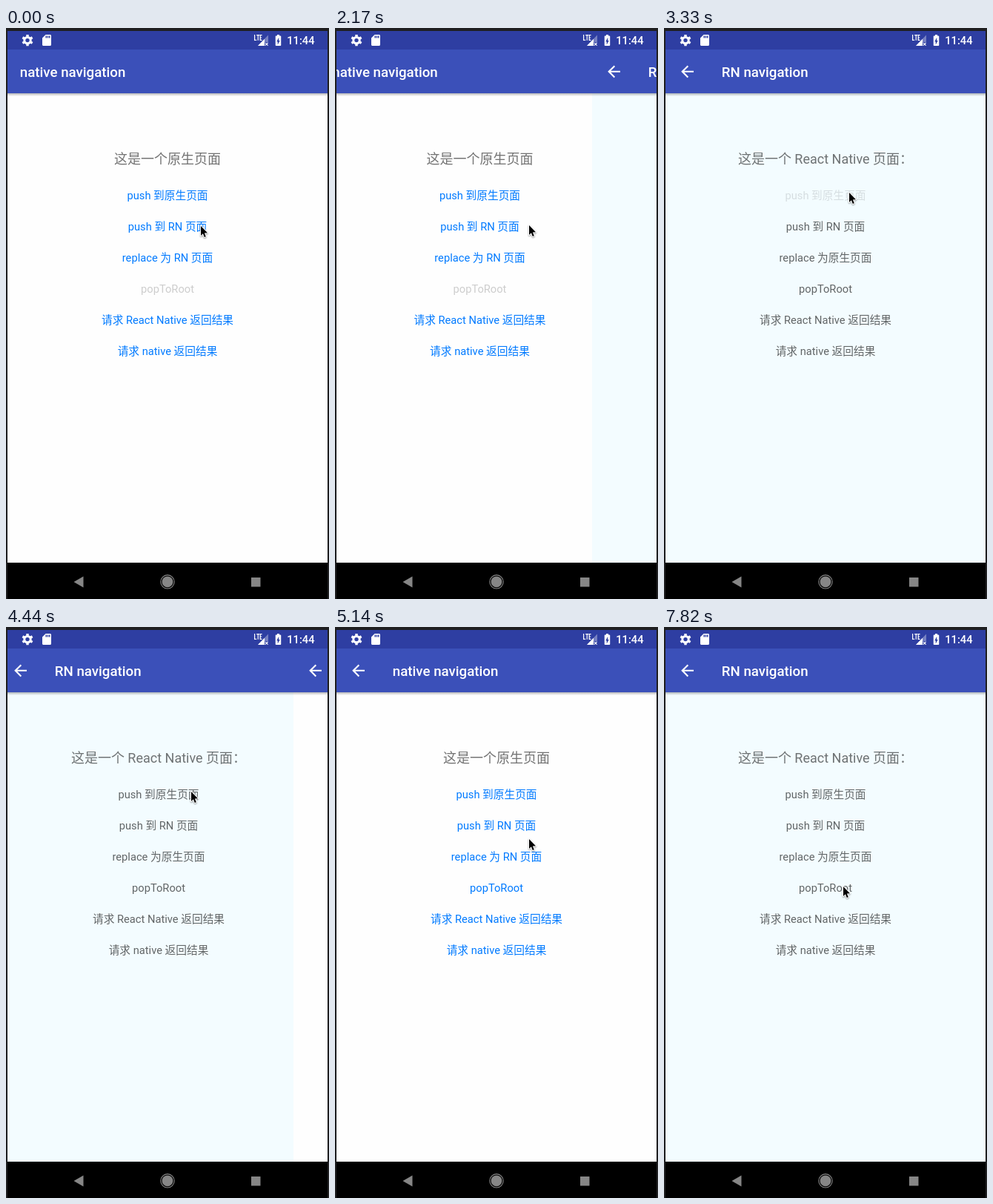
Recreate the animation shown at these times as an HTML page with a canvas. Size 436 by 770 pixels, loop 8000 ms.

```html
<!DOCTYPE html>
<html lang="zh-CN">
<head>
<meta charset="utf-8">
<title>Navigation</title>
<style>
html, body { margin: 0; width: 100%; height: 100%; overflow: hidden; background: #1f1f21; }
canvas { display: block; }
</style>
</head>
<body>
<canvas id="stage" width="436" height="770"></canvas>
<script>
const ctx = document.getElementById('stage').getContext('2d');
const LOOP = 8000, LEFT = 2, WIDTH = 432, TICK = 88;
const FAMILY = 'Roboto, "Noto Sans CJK SC", "Noto Sans CJK", sans-serif';
const GRAY = 'rgba(0,0,0,.55)';

const icons = {
  back: new Path2D('M20 11H7.83l5.59-5.59L12 4l-8 8 8 8 1.41-1.41L7.83 13H20z'),
  card: new Path2D('M18 2h-8L4 8v12c0 1.1.9 2 2 2h12c1.1 0 2-.9 2-2V4c0-1.1-.9-2-2-2zM12 8h-2V4h2zM15 8h-2V4h2zM18 8h-2V4h2z'),
  battery: new Path2D('M15.67 4H14V2h-4v2H8.33C7.6 4 7 4.6 7 5.33v15.33C7 21.4 7.6 22 8.33 22h7.33c.74 0 1.34-.6 1.34-1.33V5.33C17 4.6 16.4 4 15.67 4zM11 20v-5.5H9L13 7v5.5h2z'),
  lte: new Path2D('M335.6 9v7.4h2.6M338.2 9.6h4M340.2 9.6v7.2M345.6 9.6h-2.4v6.8h2.4M343.2 13h2'),
  arrow: new Path2D('M0 0V13L2.9 10.2 4.8 15 6.8 14.2 4.9 9.6 9 9.3z')
};

const links = replaceLabel => ['push 到原生页面', 'push 到 RN 页面', replaceLabel, 'popToRoot',
  '请求 React Native 返回结果', '请求 native 返回结果'];

const nativePage = { title: 'native navigation', head: '这是一个原生页面',
  links: links('replace 为 RN 页面'), bg: '#fefefe', ink: '#007aff' };
const root = { ...nativePage, isRoot: true };
const rnPage = { title: 'RN navigation', head: '这是一个 React Native 页面：',
  links: links('replace 为原生页面'), bg: '#f3fcff', ink: 'rgba(0,0,0,.6)' };

// Pointer moves: start time, number of steps, destination
const moves = [
  [90, 1, 263, 266], [350, 2, 262, 266], [2620, 6, 250, 222],
  [4964, 3, 262, 286], [5230, 5, 258, 310], [7380, 6, 242, 350]
];

function rect(x, y, w, h, fill) {
  ctx.fillStyle = fill;
  ctx.fillRect(x, y, w, h);
}

function text(str, x, y, size, fill, weight = 400, align = 'left') {
  ctx.font = `${weight} ${size}px ${FAMILY}`;
  ctx.textAlign = align;
  ctx.fillStyle = fill;
  ctx.fillText(str, x, y);
}

function icon(path, cx, cy, scale) {
  ctx.save();
  ctx.translate(cx, cy);
  ctx.scale(scale, scale);
  ctx.translate(-12, -12);
  ctx.fillStyle = '#fff';
  ctx.fill(path, 'evenodd');
  ctx.restore();
}

function polygon(fill, ...points) {
  ctx.beginPath();
  points.forEach(([x, y]) => ctx.lineTo(x, y));
  ctx.fillStyle = fill;
  ctx.fill();
}

function disc(x, y, r) {
  ctx.beginPath();
  ctx.arc(x, y, r, 0, Math.PI * 2);
}

function drawPage(page, dx, pressed = -1) {
  ctx.save();
  ctx.translate(dx, 0);
  rect(LEFT, 88, WIDTH, 634, page.bg);
  const shade = ctx.createLinearGradient(0, 88, 0, 92);
  shade.addColorStop(0, 'rgba(0,0,0,.28)');
  shade.addColorStop(1, 'rgba(0,0,0,0)');
  rect(LEFT, 88, WIDTH, 4, shade);
  rect(LEFT, 29, WIDTH, 59, '#3b50b9');
  if (!page.isRoot) icon(icons.back, 31.6, 58.8, 1.05);
  text(page.title, page.isRoot ? 18.8 : 77.8, 65.8, 18.7, '#fff', 500);
  text(page.head, 218, 182.8, 18, GRAY, 400, 'center');
  page.links.forEach((label, i) => {
    ctx.globalAlpha = i === pressed ? 0.2 : 1;
    const ink = page.isRoot && i === 3 ? '#cdcdcd' : page.ink;
    text(label, 218, 231.4 + 42 * i, 14.7, ink, 400, 'center');
  });
  ctx.restore();
}

function drawGear(x, y) {
  ctx.strokeStyle = '#fff';
  ctx.lineWidth = 3;
  disc(x, y, 4.2);
  ctx.stroke();
  ctx.lineWidth = 3.4;
  ctx.beginPath();
  for (let i = 0; i < 6; i++) {
    const a = Math.PI * (i / 3 + 1 / 6), c = Math.cos(a), s = Math.sin(a);
    ctx.moveTo(x + 4 * c, y + 4 * s);
    ctx.lineTo(x + 7.6 * c, y + 7.6 * s);
  }
  ctx.stroke();
}

function drawStatus() {
  rect(LEFT, 4, WIDTH, 25, '#2e3ea2');
  drawGear(29, 16.6);
  icon(icons.card, 55, 16.5, 0.75);
  polygon('rgba(255,255,255,.35)', [340, 24], [354, 24], [354, 9.5]);
  polygon('#fff', [340, 24], [349, 24], [349, 14.7]);
  ctx.strokeStyle = '#fff';
  ctx.lineWidth = 1.2;
  ctx.stroke(icons.lte);
  rect(349, 19, 5.5, 5.5, '#2e3ea2');
  ctx.beginPath();
  ctx.moveTo(349.8, 19.8);
  ctx.lineTo(353.6, 23.6);
  ctx.moveTo(353.6, 19.8);
  ctx.lineTo(349.8, 23.6);
  ctx.stroke();
  icon(icons.battery, 367.5, 16.5, 0.75);
  text('11:44', 379.2, 22, 14.7, '#fff', 500);
}

function drawNav() {
  const gray = '#868686';
  rect(LEFT, 721, WIDTH, 49, '#000');
  polygon(gray, [91.5, 747], [104.5, 739.5], [104.5, 754.5]);
  disc(218, 746.8, 7.4);
  ctx.fill();
  disc(218, 746.8, 9.2);
  ctx.strokeStyle = gray;
  ctx.lineWidth = 1.1;
  ctx.stroke();
  rect(331, 741, 12.5, 12.5, gray);
}

function drawPointer(t) {
  let x = 263, y = 267;
  for (const [start, n, tx, ty] of moves) {
    if (t < start) break;
    const u = Math.min(n, Math.floor((t - start) / TICK) + 1) / n;
    const k = u * u * (3 - 2 * u);
    x += (tx - x) * k;
    y += (ty - y) * k;
  }
  ctx.save();
  ctx.translate(x, y);
  ctx.lineJoin = 'round';
  ctx.lineWidth = 2;
  ctx.strokeStyle = '#fff';
  ctx.shadowColor = 'rgba(0,0,0,.4)';
  ctx.shadowBlur = 2;
  ctx.shadowOffsetY = 1;
  ctx.stroke(icons.arrow);
  ctx.shadowColor = 'transparent';
  ctx.fillStyle = '#000';
  ctx.fill(icons.arrow);
  ctx.restore();
}

// Accelerate-decelerate over 400 ms, sampled every 90 ms from the first visible step
function slide(from, to, t, first, start) {
  const sampled = first + Math.floor((t - first) / 90) * 90;
  const u = Math.min(1, Math.max(0, (sampled - start) / 400));
  const p = u > 0.96 ? 1 : 0.5 - 0.5 * Math.cos(Math.PI * u);
  if (p < 1) drawPage(from, -0.259 * WIDTH * p);
  drawPage(to, Math.round(WIDTH * (1 - p)));
}

function drawScreen(t) {
  if (t < 1990) drawPage(root, 0, t >= 1070 ? 1 : -1);
  else if (t < 2620) slide(root, rnPage, t, 1990, 2051.5);
  else if (t < 4440) drawPage(rnPage, 0, t >= 3330 ? 0 : -1);
  else if (t < 4960) slide(rnPage, nativePage, t, 4440, 4355);
  else if (t < 6930) drawPage(nativePage, 0, t >= 5950 && t < 6670 ? 2 : -1);
  else drawPage(rnPage, 0);
}

function render(now) {
  const t = now % LOOP;
  rect(0, 0, 436, 770, '#1f1f21');
  ctx.save();
  ctx.beginPath();
  ctx.rect(LEFT, 4, WIDTH, 766);
  ctx.clip();
  drawScreen(t);
  drawStatus();
  drawNav();
  ctx.restore();
  drawPointer(t);
}

function frame() {
  render(performance.now());
  requestAnimationFrame(frame);
}
frame();
</script>
</body>
</html>
```
